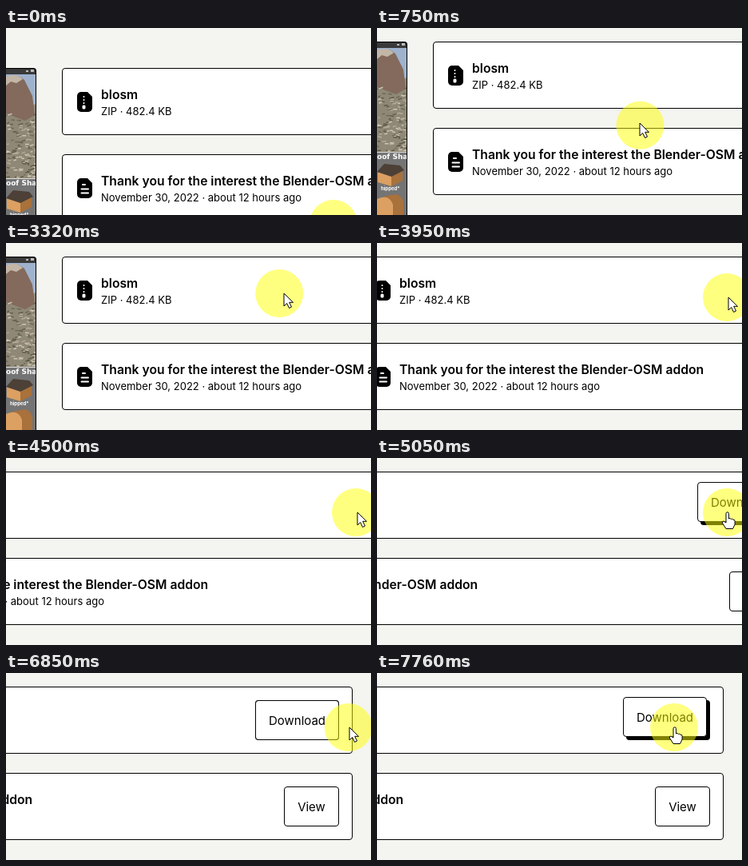
Write an HTML page that moves like this. It is 457 by 234 pixels and loops after 8.42 s.

```html
<!DOCTYPE html>
<html lang="en">
<head>
<meta charset="utf-8">
<style>
html, body { margin: 0; width: 100%; height: 100%; overflow: hidden; background: #f4f4f0; }
svg { display: block; width: 457px; height: 234px; font: 13px Inter, sans-serif; }
.box { fill: #fff; stroke: #000; rx: 3.5px; }
.title { font-size: 15.7px; font-weight: 600; }
.label { font-size: 15px; text-anchor: middle; }
.marks { stroke: #fff; stroke-width: 2; stroke-linecap: round; }
</style>
</head>
<body>
<svg viewBox="0 0 457 234">
  <defs>
    <path id="file" d="M5 0H13L19 6V20a5 5 0 0 1-5 5H5a5 5 0 0 1-5-5V5a5 5 0 0 1 5-5z"/>
    <rect id="card" class="box" x="70.5" width="830" height="83"/>
    <clipPath id="frame"><path d="M-20 17H34a4 4 0 0 1 4 4V300H-20z"/></clipPath>
  </defs>
  <g id="page">
    <g clip-path="url(#frame)">
      <path fill="#9fb2cd" d="M0 17H38V80H0z"/>
      <path fill="#8f8876" d="M0 72L38 62V156H0z"/>
      <path fill="#836a5c" d="M0 29Q12 23 23 32L33 52 36 76 24 83 0 74z"/>
      <path fill="#c4b6a6" d="M0 28Q12 23 21 31L13 36 6 34 0 39z"/>
      <g id="gravel"></g>
      <path fill="#3a3a3a" d="M0 17H38V25H0z"/>
      <path fill="#bbb" d="M25 20h3v2h-3zM31 19h4v3h-4z"/>
      <path fill="#747474" d="M0 156H38V300H0z"/>
      <path fill="#ddd" d="M0 155H38v1H0z"/>
      <text y="164" fill="#fff" style="font:bold 9px 'DejaVu Sans',sans-serif">oof Sha</text>
      <path fill="#dba062" d="M1 180L18 185V198L1 193z"/>
      <path fill="#a9713b" d="M18 185L32 178V191L18 198z"/>
      <path fill="#4c4037" d="M0 180L9 170 29 172 34 178 18 186z"/>
      <text x="5" y="203" fill="#fff" style="font:bold 6px Inter,sans-serif">hipped*</text>
      <path fill="#a9713b" d="M8 211L24 208Q34 211 33 223V234H18z"/>
      <path fill="#dba062" d="M0 214Q15 207 20 221V240H0z"/>
    </g>
    <path fill="none" stroke="#000" d="M0 17.5H34a3.500 3.500 0 0 1 3.500 3.500V300"/>

    <use href="#card" y="17.5"/>
    <use href="#file" x="89" y="47"/>
    <path class="marks" stroke-dasharray="0 4" d="M97.500 53V62"/>
    <rect x="95.5" y="63.5" width="4" height="5" rx="1.5" fill="#fff"/>
    <text class="title" x="119" y="56">blosm</text>
    <text x="119" y="76">ZIP · 482.4 KB</text>

    <use href="#card" y="125.5"/>
    <use href="#file" x="89" y="155"/>
    <path class="marks" d="M96 163H99M94.500 168.500H103M94.500 173.500H103"/>
    <text class="title" x="119" y="164">Thank you for the interest the Blender-OSM addon</text>
    <text x="119" y="184">November 30, 2022 · about 12 hours ago</text>

    <rect x="779" y="34" width="105" height="50" rx="4"/>
    <g id="download">
      <rect class="box" x="779.5" y="34.5" width="104" height="49"/>
      <text class="label" x="831.5" y="65">Download</text>
    </g>
    <rect class="box" x="815.5" y="142.5" width="68" height="49"/>
    <text class="label" x="849.5" y="173">View</text>
  </g>
  <circle id="halo" r="30" fill="#ff0" opacity=".5"/>
  <g id="pointer" fill="#fff" stroke="#000" stroke-linejoin="round">
    <path id="arrow" d="M0 0V16L3.700 12.500 6.500 18.500 9.500 17 6.700 11.300H11.500z"/>
    <path id="hand" d="M-3 13V1.500a1.700 1.700 0 0 1 3.400 0V8q1.500-1.500 3 .5 1.500-1 2.500.7 2.200-.5 2.200 1.800V15L5.500 20.500H-3L-7.500 13.500q-1-2.500 1.500-2.500z"/>
  </g>
</svg>
<script>
const LOOP = 8420, STEP = 70;
const $ = id => document.getElementById(id);
const move = (id, x, y) => $(id).setAttribute("transform", `translate(${x} ${y})`);

const ramp = (t, from, to) => Math.min(1, Math.max(0, (t - from) / (to - from)));
function ease(t, from, to) {
  const p = ramp(t, from, to);
  return p * p * (3 - 2 * p);
}

function snap(t) {
  if (t < 330) return t < 70 ? 0 : 70;
  const start = t < 2400 ? 330 : t < 6640 ? 2400 : 6640;
  return start + Math.floor((t - start) / STEP) * STEP;
}

const panX = t => 467 * (1 - (1 - ramp(t, 3320, 6040) ** 1.8) ** 3);
const panY = t => t < 70 ? 33 : t < 400 ? 3 : 0;
const haloX = t => 410 - 268 * ease(t, 150, 1800) + 296 * ease(t, 2380, 3880) - 66 * ease(t, 6570, 7760);
const haloY = t => (t < 70 ? 245 : 215) - 152 * ease(t, 70, 1250) + 5 * ease(t, 3300, 3900);
const lift = t => 4 * (ease(t, 4850, 5000) - ease(t, 5460, 5600) + ease(t, 7200, 7520));

function draw(now) {
  const t = snap(now % LOOP);
  const scroll = Math.round(panX(t));
  // The halo trails the pointer slightly.
  const tipX = Math.round(haloX(t + 12) + 2), tipY = Math.round(haloY(t + 12));
  const over = tipX + scroll > 779 && tipX + scroll < 884;
  move("page", -scroll, panY(t));
  move("download", -lift(t), -lift(t));
  move("halo", haloX(t), haloY(t));
  move("pointer", tipX, t < 70 ? 245 : tipY);
  $("arrow").style.display = over ? "none" : "";
  $("hand").style.display = over ? "" : "none";
}

// Rocky ground in the screenshot.
let seed = 7;
const random = () => (seed = seed * 16807 % 2147483647) / 2147483647;
const tones = ["#5f5b4a", "#6d6a58", "#b5ab98", "#cfc6b4"];
$("gravel").innerHTML = Array.from({ length: 130 }, () => {
  const x = random() * 38, y = 76 + random() * 78, tone = tones[Math.floor(random() * 4)];
  return `<path stroke="${tone}" stroke-width="1.5" d="M${x} ${y}l${2 + random() * 4} ${random() * 4 - 2}"/>`;
}).join("");

const begin = performance.now();
function loop() {
  draw(performance.now() - begin);
  requestAnimationFrame(loop);
}
loop();
</script>
</body>
</html>
```
